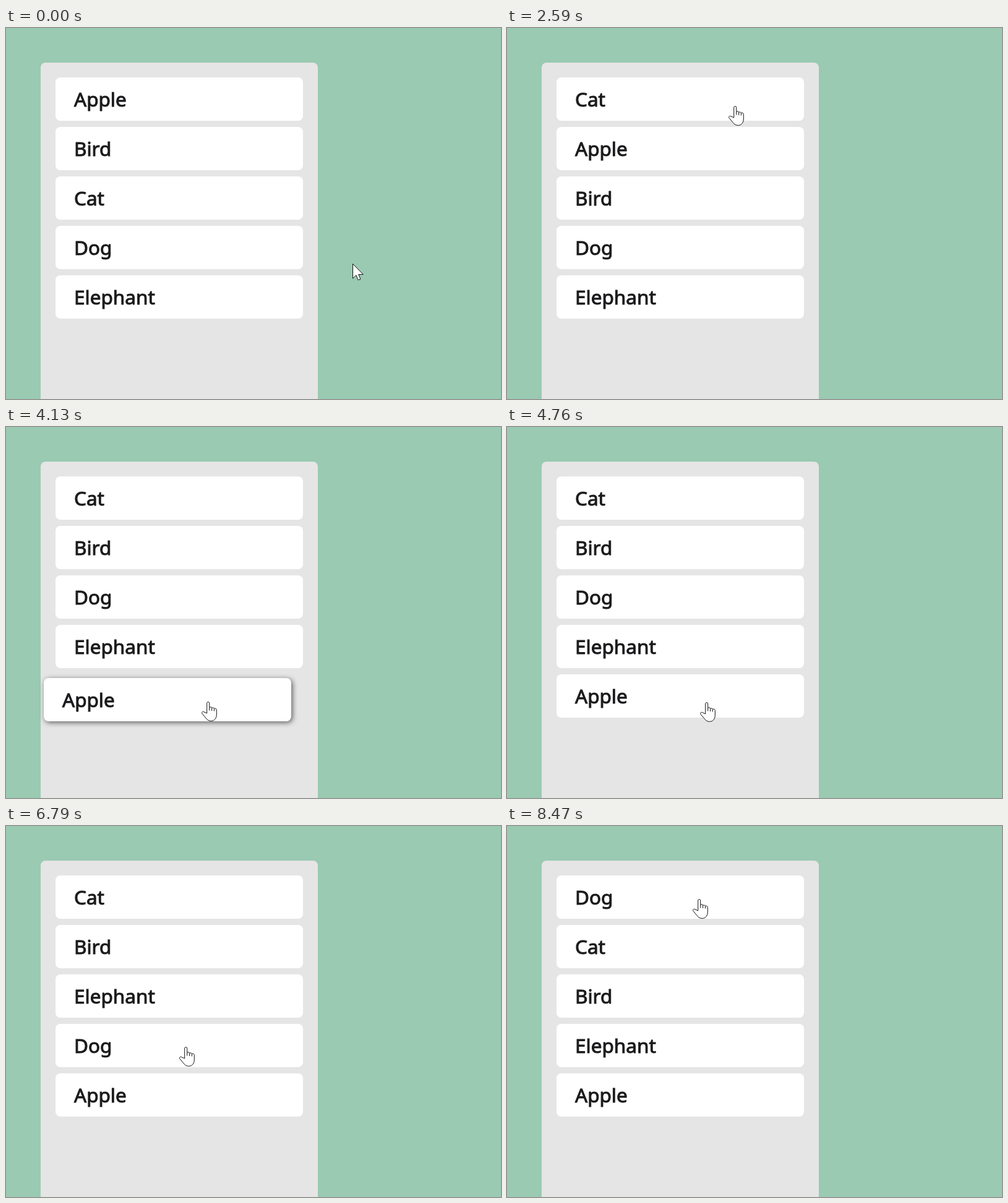
An HTML page that plays this animation: 800 px wide and 600 px high, repeating every 8890 ms.

```html
<!DOCTYPE html>
<html lang="en">
<head>
<meta charset="utf-8">
<title>Sortable list</title>
<style>
  html, body { margin: 0; width: 100%; height: 100%; overflow: hidden; background: #9acab2; }
  #stage { position: relative; width: 800px; height: 600px; overflow: hidden; }
  #panel { position: absolute; left: 56px; top: 56px; width: 448px; height: 600px; border-radius: 8px; background: #e5e5e5; }
  .card {
    position: absolute; left: 0; top: 0; box-sizing: border-box;
    width: 400px; height: 70px; padding-left: 30px; border-radius: 8px;
    background: #fff; color: #1b1b1d;
    font: 400 31.5px/70px "Noto Sans", sans-serif;
    -webkit-text-stroke: 1px #1b1b1d;
  }
  .card.held { z-index: 1; box-shadow: 2px 2px 8px rgba(0, 0, 0, .6); }
  svg { position: absolute; left: 0; top: 0; z-index: 2; overflow: visible; fill: #fff; stroke: #111; stroke-linejoin: round; }
</style>
</head>
<body>
<div id="stage">
  <div id="panel"></div>
  <svg id="arrow" width="18" height="27">
    <path d="M.5.5V24l5.4-5.2 3.2 7.8 3.9-1.6-3.3-7.4h7.6z"/>
  </svg>
  <svg id="hand" width="25" height="32">
    <path d="M8.7 19V2.8a2 2.2 0 0 1 4 0V9.5c1.2-1.2 3.8-.8 3.9.9 1-.9 3.6-.4 3.8 1 1.5-.8 3.9 0 3.9 2.2V21c0 6-3.4 10.4-8.8 10.4-4.5 0-6.5-2-9-5.3L1 19.5c-1.5-2.2 1-4.1 3-2.7z"/>
    <path fill="none" d="M12.7 9.5v5M16.6 10.4V15M20.4 11.4v4.1"/>
  </svg>
</div>
<script>
const LOOP = 8890, STEP = 70, LEFT = 80, TOP = 80, PITCH = 80, WIDTH = 400, HEIGHT = 70;
const names = ["Apple", "Bird", "Cat", "Dog", "Elephant"];

// The pointer glides from stop to stop
const home = { x: 560, y: 381 };
const moves = [
  { start: 0, end: 770, x: 377, y: 279 },
  { start: 1274, end: 2180, x: 378, y: 99 },
  { start: 2180, end: 3290, x: 346, y: 188 },
  { start: 3330, end: 4370, x: 323, y: 484 },
  { start: 4370, end: 5380, x: 320, y: 367 },
  { start: 5410, end: 6090, x: 330, y: 256 },
  { start: 6090, end: 6580, x: 290, y: 357 },
  { start: 6790, end: 7840, x: 309, y: 101 },
  { start: 7840, end: 8470, x: 310, y: 118 }
];
const drags = [
  { name: "Cat", grab: 1396, drop: 2240 },
  { name: "Apple", grab: 3445, drop: 4480 },
  { name: "Elephant", grab: 5527, drop: 6160 },
  { name: "Dog", grab: 6908, drop: 7910 }
];

const stage = document.getElementById("stage");
const arrow = document.getElementById("arrow");
const hand = document.getElementById("hand");
const cards = {};
for (const name of names) {
  const card = cards[name] = document.createElement("div");
  card.className = "card";
  card.textContent = name;
  stage.append(card);
}

const clamp = (value, low, high) => Math.max(low, Math.min(high, value));
const smooth = u => u * u * (3 - 2 * u);
const slotTop = slot => TOP + slot * PITCH;

function pointerAt(time) {
  let { x, y } = home;
  for (const move of moves) {
    const part = smooth(clamp((time - move.start) / (move.end - move.start), 0, 1));
    x += (move.x - x) * part;
    y += (move.y - y) * part;
  }
  return { x, y };
}

// A held card takes the slot whose near edge the pointer has crossed
function slotUnder(y, up) {
  const slot = up ? Math.ceil((y - TOP - HEIGHT) / PITCH) : Math.floor((y - TOP) / PITCH);
  return clamp(slot, 0, names.length - 1);
}

function isOverCard({ x, y }) {
  const down = y - TOP;
  return x >= LEFT && x < LEFT + WIDTH && down >= 0 &&
    down < names.length * PITCH && down % PITCH < HEIGHT;
}

function place(element, x, y) {
  element.style.transform = `translate(${Math.round(x)}px, ${Math.round(y)}px)`;
}

function draw(time) {
  const pointer = pointerAt(time);
  const order = [...names];
  let held = null;
  for (const { name, grab, drop } of drags) {
    if (time < grab) break;
    const from = order.indexOf(name);
    const grip = pointerAt(grab);
    const up = pointerAt(drop).y < grip.y;
    const to = slotUnder(pointerAt(Math.min(time, drop)).y, up);
    order.splice(from, 1);
    order.splice(to, 0, name);
    if (time < drop) {
      held = { name, x: LEFT + pointer.x - grip.x, y: slotTop(from) + pointer.y - grip.y };
    }
  }

  order.forEach((name, slot) => {
    const isHeld = held !== null && held.name === name;
    cards[name].classList.toggle("held", isHeld);
    if (isHeld) place(cards[name], held.x, held.y);
    else place(cards[name], LEFT, slotTop(slot));
  });

  const pointing = held !== null || isOverCard(pointer);
  hand.style.display = pointing ? "" : "none";
  arrow.style.display = pointing ? "none" : "";
  place(hand, pointer.x - 10, pointer.y);
  place(arrow, pointer.x, pointer.y);
}

const begin = performance.now();
function tick() {
  const time = (performance.now() - begin) % LOOP;
  draw(Math.floor(time / STEP) * STEP);
  requestAnimationFrame(tick);
}
tick();
</script>
</body>
</html>
```
